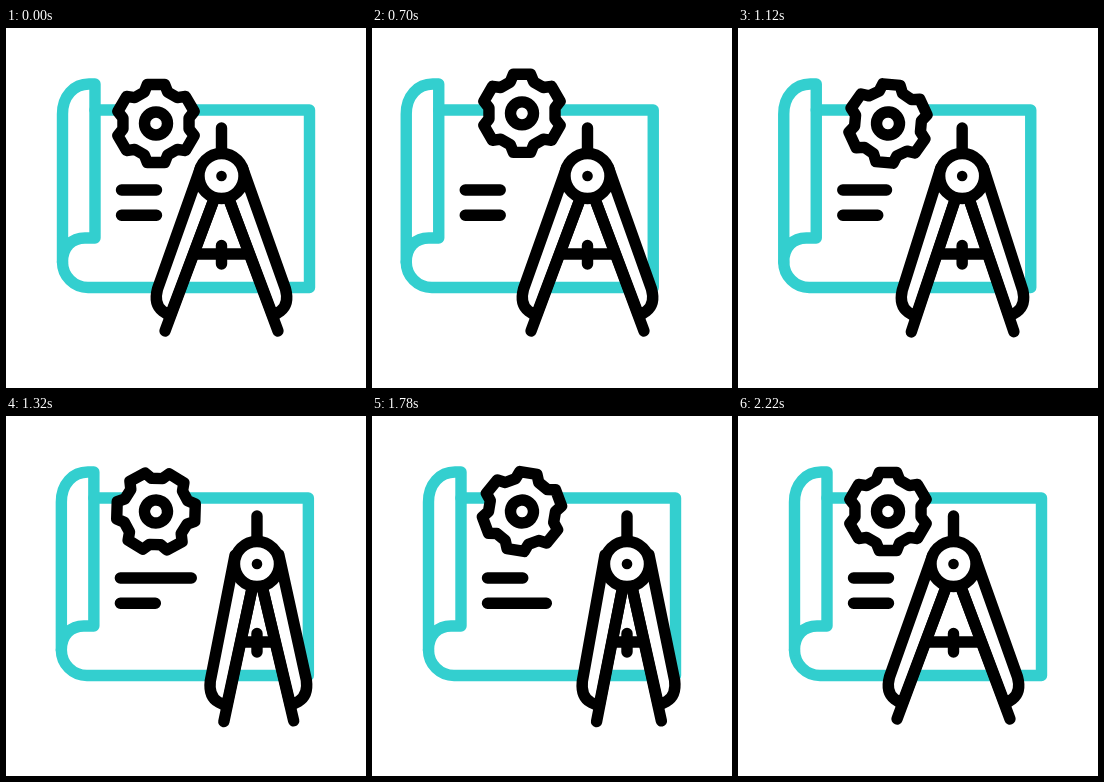
Animation, 360 px wide and 360 px high, one loop 2.4 s. Source, as an HTML page with a canvas:

```html
<!DOCTYPE html>
<html lang="en">
<head>
<meta charset="utf-8">
<title>Blueprint</title>
<style>
  html, body { margin: 0; width: 100%; height: 100%; overflow: hidden; background: #fff; }
  canvas { display: block; width: 360px; height: 360px; }
</style>
</head>
<body>
<canvas id="stage" width="360" height="360"></canvas>
<script>
const ctx = document.getElementById('stage').getContext('2d');
const LOOP = 2400;
const TEAL = '#33cfcf';
const BLACK = '#000';
const RAD = Math.PI / 180;

ctx.lineWidth = 11.4;
ctx.lineCap = ctx.lineJoin = 'round';

// Eased progress from 0 to 1 between two times.
function ease(t, from, to) {
  const p = Math.min(1, Math.max(0, (t - from) / (to - from)));
  return p * p * (3 - 2 * p);
}

// Rises to 1 at the peak, then falls back to 0.
const pulse = (t, from, peak, to) => ease(t, from, peak) - ease(t, peak, to);

function shape(d, color, filled) {
  const path = new Path2D(d);
  if (filled) {
    ctx.fillStyle = '#fff';
    ctx.fill(path);
  }
  ctx.strokeStyle = color;
  ctx.stroke(path);
}

function ring(r, filled) {
  shape(`M${r} 0A${r} ${r} 0 1 1 ${-r} 0A${r} ${r} 0 1 1 ${r} 0Z`, BLACK, filled);
}

function at(x, y, draw) {
  ctx.save();
  ctx.translate(x, y);
  draw();
  ctx.restore();
}

function drawPaper(t) {
  const shift = -24 * pulse(t, 200, 800, 1400);
  const upper = 40 * pulse(t, 1000, 1400, 1800);
  const lower = 24 * pulse(t, 1400, 1800, 2200);
  at(shift, 0, () => {
    shape('M89 82H303.5V259.5H82A25.5 25.5 0 0 1 56.5 234', TEAL);
    shape('M56.5 234V86C56.5 68 68 56 83 56H89V210H79C66 210 56.5 219 56.5 234', TEAL);
    shape(`M115.5 162H${150.5 + upper}M115.5 187.3H${150.5 + lower}`, BLACK);
  });
}

function gearOutline() {
  const corners = [[33.5, -20.5], [40, -12.5], [40, 12.5], [33.5, 20.5]];
  const points = [];
  for (let tooth = 0; tooth < 6; tooth++) {
    for (const [r, offset] of corners) {
      const a = (tooth * 60 + offset) * RAD;
      points.push(`${r * Math.sin(a)} ${-r * Math.cos(a)}`);
    }
  }
  return `M${points.join('L')}Z`;
}
const GEAR = gearOutline();

function drawGear(t) {
  const lift = 20 * (pulse(t, 200, 400, 600) + pulse(t, 600, 800, 1000));
  at(150, 95.5 - lift, () => {
    ctx.rotate(180 * RAD * ease(t, 1000, 2200));
    shape(GEAR, BLACK, true);
    ring(11.5);
  });
}

// Side is 1 for the left leg, -1 for its mirror image.
function drawLeg(side, angle, lift) {
  at(0, -lift, () => {
    ctx.scale(side, 1);
    ctx.rotate(-angle * RAD);
    shape('M-7 22L-51.5 140L-59 135Q-68 128 -64 113L-21 -8Z', BLACK, true);
    shape('M-7 22L-56.5 155', BLACK);
  });
}

function drawCompass(t) {
  const p = ease(t, 1000, 1400) - ease(t, 1800, 2200);
  at(215.5 + 39.5 * p, 148, () => {
    shape('M-26 78H26M0 69.5V88M0 -48V-20', BLACK);
    drawLeg(1, 9.4 * p, 4.5 * p);
    drawLeg(-1, 8 * p, 4.5 * p);
    ring(22.5, true);
    ctx.fillStyle = BLACK;
    ctx.beginPath();
    ctx.arc(0, 0, 5.3, 0, 2 * Math.PI);
    ctx.fill();
  });
}

function render(t) {
  ctx.fillStyle = '#fff';
  ctx.fillRect(0, 0, 360, 360);
  drawPaper(t);
  drawGear(t);
  drawCompass(t);
}

function tick() {
  render(performance.now() % LOOP);
  requestAnimationFrame(tick);
}
tick();
</script>
</body>
</html>
```
